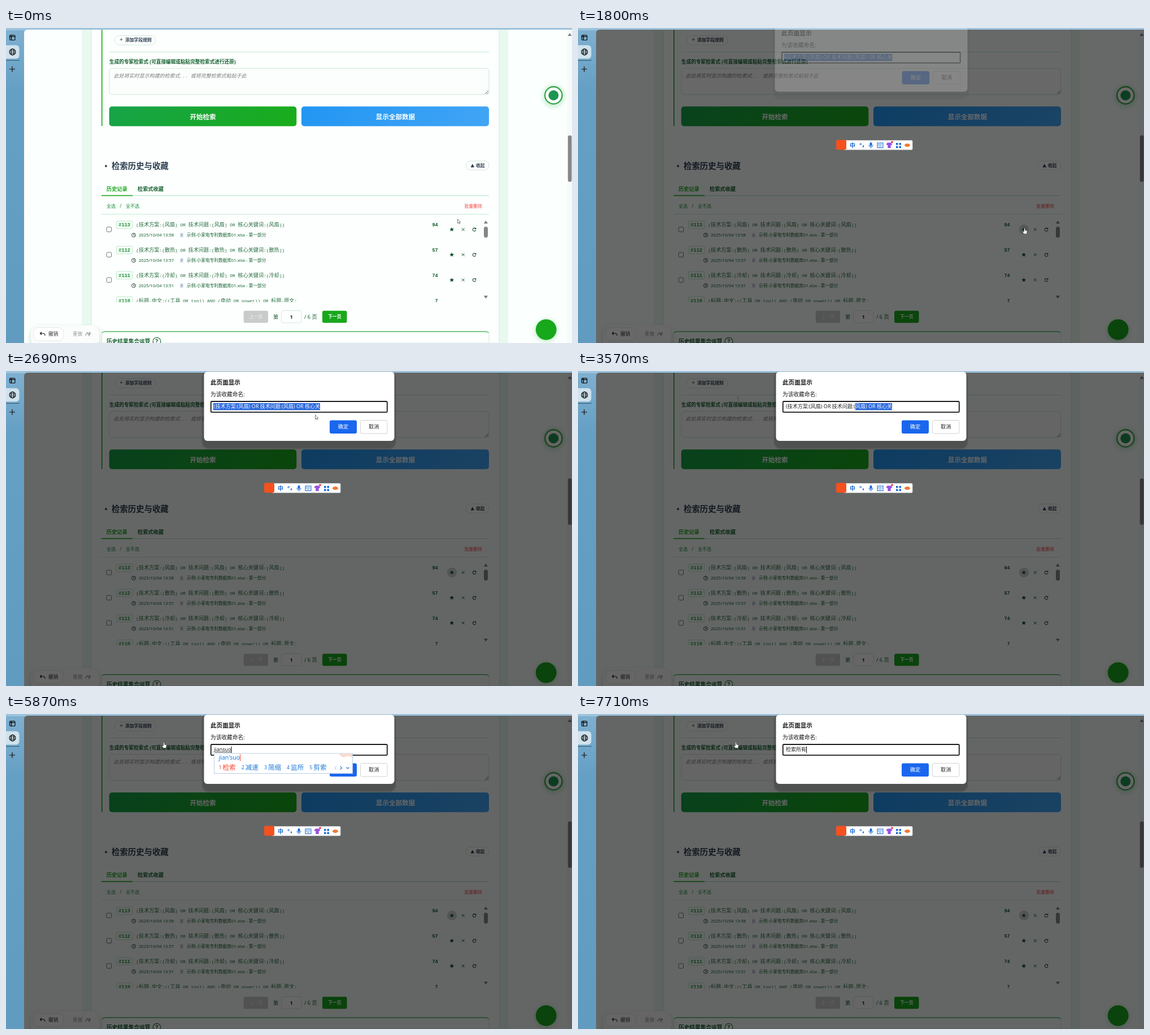
Write an HTML page that moves like this. It is 1002 by 559 pixels and loops after 8 s.

```html
<!DOCTYPE html>
<html lang="zh-CN">
<head>
<meta charset="utf-8">
<title>检索历史与收藏</title>
<style>
html, body { margin: 0; width: 100%; height: 100%; overflow: hidden; background: #649dc2; }
svg { display: block; width: 1002px; height: 559px; }
text { font-family: "Noto Sans", "Noto Sans CJK SC", sans-serif; white-space: pre; }
.mono { font-family: "Liberation Mono", "Noto Sans CJK SC", monospace; }
.b { font-weight: 700; }
.m { font-weight: 500; }
.mid { text-anchor: middle; }
.ink { fill: #2c3e50; }
.green { fill: #18a81c; }
.dark { fill: #14602f; }
.query { fill: #256b3f; }
.white { fill: #fff; }
.line { fill: none; stroke: #c4ead6; }
.pill { fill: #fdfffe; stroke: #d3e8dd; }
.stroke { fill: none; stroke: #111; }
.blue { fill: #1f7bd8; }
</style>
</head>
<body>
<svg viewBox="0 0 1002 559">
  <defs>
    <linearGradient id="go" gradientUnits="userSpaceOnUse" x1="183" y1="139.500" x2="365.800" y2="322.300">
      <stop offset="0" stop-color="#16a34a"/><stop offset="1" stop-color="#1aad19"/>
    </linearGradient>
    <linearGradient id="all" gradientUnits="userSpaceOnUse" x1="523" y1="139.500" x2="706.300" y2="322.800">
      <stop offset="0" stop-color="#2196f3"/><stop offset="1" stop-color="#42a5f5"/>
    </linearGradient>
    <linearGradient id="side" x1="0" y1="0" x2="0" y2="1">
      <stop offset="0" stop-color="#7fb0d0"/><stop offset=".2" stop-color="#659fc4"/><stop offset="1" stop-color="#619bc0"/>
    </linearGradient>
    <filter id="soft" x="-50%" y="-50%" width="200%" height="200%"><feGaussianBlur stdDeviation="3"/></filter>
    <filter id="edge" x="-10%" y="-20%" width="120%" height="140%"><feGaussianBlur stdDeviation="1.2"/></filter>
    <clipPath id="page"><path d="M32 559V9q0-6 6-6H1002V559z"/></clipPath>
    <clipPath id="list"><rect x="169" y="331" width="686" height="155.500"/></clipPath>
    <clipPath id="selClip"><rect id="selBox" y="56" height="14"/></clipPath>
    <path id="star" d="M0-4 1.1-1.3 4-1.2 1.8.6 2.5 3.4 0 1.8-2.5 3.4-1.8.6-4-1.2-1.1-1.3z" fill="#14502f"/>
    <path id="cross" d="M-2.4-2.4 2.4 2.4M2.4-2.4-2.4 2.4" stroke="#14502f" fill="none"/>
    <g id="redo"><path d="M2.2-1.6A2.8 2.8 0 1 0 2.8.8" stroke="#14502f" stroke-width="1.1" fill="none"/><path d="M3.3-3.4V-.4H.3z" fill="#14502f"/></g>
    <g id="clock" fill="none" stroke="#35493f"><circle r="3.5"/><path d="M0-2.4V.3H2.2"/></g>
    <g id="sheet"><path d="M-3-4H2L3-3V4H-3z" fill="#dfe3ee"/><path d="M-1.8-1.5H2M-1.8.3H2M-1.8 2H1" stroke="#8c93ba" stroke-width=".8"/></g>
  </defs>

  <rect width="1002" height="559" fill="url(#side)"/>
  <rect width="1002" height="4" fill="#9dc3dd"/>
  <rect x="-6" y="30.500" width="29.500" height="24" rx="6" fill="#cfe2ed"/>
  <g class="stroke" stroke-width="1.2">
    <rect x="6.500" y="12.500" width="9.500" height="9" rx="2"/><path d="M6.500 15H16M9.500 13V21" stroke-width="1.600"/>
    <circle cx="11.500" cy="42.500" r="5.400"/><ellipse cx="11.500" cy="42.500" rx="2.400" ry="5.400"/><path d="M6.500 40.700H16.500M6.500 44.300H16.500" stroke-width=".9"/>
    <path d="M6 73H16M11 68V78"/>
    <path d="M0 57.500H24" stroke="#35586e" stroke-width="1"/>
  </g>

  <g clip-path="url(#page)">
    <rect x="32" width="970" height="559" fill="#fbfffd"/>
    <rect x="134" width="755" height="559" fill="#e9f9f0"/>
    <path d="M151 0H873V559H151z" fill="#fcfffd" stroke="#cfe9dc"/>
    <rect x="169" width="1.600" height="174" class="green"/>

    <rect x="192.500" y="13.500" width="72.500" height="16.500" rx="8.200" class="pill"/>
    <text x="204" y="24.300" font-size="10" class="ink mid">+</text>
    <text x="211" y="24.400" font-size="7.800" class="ink b">添加字段规则</text>
    <path d="M183 42.500H855" class="line"/>
    <text x="183" y="62.700" font-size="8.650" class="dark b">生成的专家检索式 (可直接编辑或粘贴完整检索式进行还原)</text>
    <rect x="183" y="71.500" width="672" height="46.500" rx="5" fill="#fbfefc" stroke="#cfe6da"/>
    <text id="hint" x="190.800" y="87.800" class="mono" font-style="italic" fill="#7d7d7d"></text>
    <path d="M848 117 854 111M851.500 117 854 114.500" stroke="#555" stroke-width=".9"/>
    <rect x="182.700" y="139.200" width="331.600" height="35" rx="5" fill="url(#go)"/>
    <text x="348.500" y="161.800" font-size="11.550" class="white b mid">开始检索</text>
    <rect x="523" y="139.200" width="332" height="35" rx="5" fill="url(#all)"/>
    <text x="689.500" y="161.800" font-size="11.550" class="white b mid">显示全部数据</text>

    <circle cx="177" cy="245" r="1.900" class="ink"/>
    <text x="187" y="249.900" font-size="14.400" class="ink b">检索历史与收藏</text>
    <rect x="814.500" y="236" width="40.500" height="16" rx="8" class="pill"/>
    <path d="M822.500 247.300H829L825.800 241z" class="ink"/>
    <text x="832" y="246.900" font-size="7.700" class="ink b">收起</text>

    <text x="178" y="289" font-size="9.200" class="green b">历史记录</text>
    <text x="233" y="289" font-size="9.200" class="dark b">检索式收藏</text>
    <path d="M169 297.500H855" class="line" style="stroke:#aee3c6"/>
    <rect x="169" y="296.600" width="55" height="1.600" class="green"/>
    <g font-size="8" fill="#16883a">
      <text x="178" y="319">全选</text><text x="201.500" y="319">/</text><text x="212" y="319">全不选</text>
      <text x="811.500" y="319" font-size="7.800" fill="#ef4444">批量删除</text>
    </g>
    <path d="M169 330.500H855" class="line"/>
    <circle id="hover" cx="789.500" cy="357.500" r="8.700" fill="#d0d8d3"/>
    <g id="rows" clip-path="url(#list)"></g>
    <path d="M845.800 347H853L849.400 341.800zM845.800 475H853L849.400 480.200z" fill="#7c7f7d"/>
    <rect x="846" y="352.500" width="7" height="19.500" rx="3.500" fill="#858786"/>

    <rect x="420.700" y="501.700" width="43.300" height="21.500" rx="3" fill="#c9cbca"/>
    <text x="442.500" y="515.400" font-size="7.900" fill="#f3f5f4" class="mid m">上一页</text>
    <text x="473" y="516" font-size="9.200" class="dark">第</text>
    <rect x="487.500" y="501.500" width="35.500" height="21.500" rx="4" class="pill"/>
    <text x="505.200" y="515.800" font-size="9.200" class="mid b" fill="#222">1</text>
    <text x="528" y="516" font-size="9.200" class="dark">/ 6 页</text>
    <rect x="560" y="501.700" width="43.500" height="21.500" rx="3" class="green"/>
    <text x="581.800" y="515.400" font-size="7.900" class="white mid b">下一页</text>

    <path d="M169.500 559V544Q169.500 539 174.500 539H850Q855 539 855 544V559" fill="none" stroke="#d6eee0"/>
    <path d="M170 541Q171.500 538.700 174.500 538.700H850Q853 538.700 854.500 541" fill="none" stroke="#169a22" stroke-width="1.100"/>
    <text x="178" y="559.600" font-size="9.700" class="dark b">历史结果集合运算</text>
    <circle cx="267" cy="556" r="6.800" fill="#fdfffe" stroke="#14602f" stroke-width="1.100"/>
    <text x="267" y="559.700" font-size="10" class="dark mid b">?</text>

    <rect x="43" y="530" width="124" height="40" rx="16" fill="#b5cfc2" opacity=".6" filter="url(#soft)"/>
    <rect x="44" y="527.500" width="121.500" height="40" rx="16" fill="#fbfdfc"/>
    <rect x="48.500" y="531.500" width="53.500" height="23.500" rx="9" fill="#fff" stroke="#e2e8e5"/>
    <path d="M63 539.500 60.500 542 63 544.500M60.500 542H66Q69 542 69 546" class="stroke" stroke-width="1.100"/>
    <text x="75" y="546.200" font-size="8.650" fill="#333">撤销</text>
    <text x="118" y="546.200" font-size="8.650" fill="#9a9d9b">重做</text>
    <path d="M147 539.500 149.500 542 147 544.500M149.500 542H144Q141 542 141 546M143 539.500 148 547" fill="none" stroke="#8d908e" stroke-width="1.100"/>

    <circle cx="956" cy="537" r="21" fill="#9fe0b0" opacity=".45" filter="url(#soft)"/>
    <circle cx="956.200" cy="535.300" r="18.400" class="green"/>
    <circle cx="969.500" cy="121" r="20" fill="#a9e0ba" opacity=".5" filter="url(#soft)"/>
    <circle cx="969.300" cy="119.500" r="15.200" fill="#fff" stroke="#3aa84c" stroke-width="2.400"/>
    <circle cx="969.300" cy="119.500" r="9" fill="#1f9650"/>

    <rect x="993.500" width="8.500" height="559" fill="#f6faf8"/>
    <path d="M994.500 14H1001.500L998 9z" fill="#7c7f7d"/>
    <rect x="994.800" y="190.500" width="6.600" height="82.500" rx="3.300" fill="#858786"/>
    <rect id="scrim" x="32" width="970" height="559"/>
  </g>

  <g id="dialog">
    <rect x="347" y="0" width="343" height="138" rx="12" opacity=".2" filter="url(#edge)"/>
    <rect x="350.500" y="1" width="337" height="123" rx="6" class="white"/>
    <text x="362" y="23.900" font-size="10.600" class="b" fill="#1b1b1b">此页面显示</text>
    <text x="362" y="44.600" font-size="9.700" fill="#1b1b1b">为该收藏命名:</text>
    <rect x="362.800" y="54" width="312" height="19.200" rx="1.500" fill="#fff" stroke="#1a1a1a" stroke-width="1.800"/>
    <text x="368" y="66.300" font-size="9" fill="#222"><tspan id="typed"></tspan><tspan id="comp" text-decoration="underline"></tspan></text>
    <g clip-path="url(#selClip)">
      <rect x="367" y="57" width="189" height="12.500" fill="#2a68dc"/>
      <text id="picked" x="368" y="66.300" font-size="9" class="white"></text>
    </g>
    <rect id="caret" y="57.500" width="1" height="11.500"/>
    <rect x="573" y="87.500" width="48" height="23.500" rx="3" fill="#1a66ee"/>
    <text x="597" y="102.400" font-size="9.200" class="white mid">确定</text>
    <rect x="627.500" y="87.500" width="47.500" height="23.500" rx="3" fill="#fff" stroke="#d2d2d2"/>
    <text x="651.200" y="102.400" font-size="9.200" class="mid" fill="#222">取消</text>
  </g>

  <g id="popup">
    <rect id="popBox" y="70" height="35.500" fill="#fff" stroke="#b9cfe6"/>
    <text id="spell" y="80.800" font-size="10.500" class="blue"></text>
    <rect id="popCaret" y="71.500" width="1" height="12" fill="#f0452a"/>
    <g id="words"></g>
    <g id="nav">
      <path d="M-24 70.500H-.5V77Q-8 73-13 76T-24 70.500" fill="#fbd9cd"/>
      <g fill="none" stroke-width="1.200"><path d="M-29 93 -31.500 95.700-29 98.500" stroke="#c9d6e4"/><path d="M-22 92.700-19 95.700-22 98.700M-11 94.500-8.500 97-6 94.500" stroke="#1f7bd8"/></g>
    </g>
  </g>

  <g id="bar">
    <rect x="470" y="199.500" width="122" height="16.500" rx="1.500" fill="#fff" stroke="#d8dde2" stroke-width=".8"/>
    <rect x="457" y="198.500" width="18" height="17.500" rx="3" fill="#f4511e"/>
    <g style="fill:#1769d2">
      <text x="486" y="211.500" font-size="10" class="mid b">中</text>
      <circle cx="500.300" cy="206" r="1.300" fill="none" stroke="#1769d2"/><path d="M503.800 208.500H506V210.500L504.300 212.500z"/>
      <rect x="516.500" y="203" width="4" height="6.500" rx="2"/><path d="M514.800 207.500Q515 211 518.500 211T522.200 207.500M518.500 211V213.500" fill="none" stroke="#1769d2"/>
      <path d="M530 204H540V212.500H530z" fill="none" stroke="#1769d2" stroke-width="1.100"/><path d="M531.500 206.300H538.500M531.500 208.300H538.500M533 210.500H537" stroke="#1769d2" stroke-dasharray="1.500 .7"/>
      <path d="M548 203.500H554L556.500 206 555 208 553.700 207.200V213H548.300V207.200L547 208 545.500 206z" fill="#9a4fe0"/><circle cx="556" cy="202.300" r="1.900" fill="#f43b3b"/>
      <path d="M563 204H566.500V207.500H563zM568.500 204H572V207.500H568.500zM563 209.500H566.500V213H563zM568.500 209.500H572V213H568.500z"/>
      <ellipse cx="583" cy="208" rx="5" ry="3" fill="#ef7a35"/>
    </g>
  </g>

  <g id="tip">
    <rect x=".7" y=".7" width="29" height="17.600" fill="#fff" stroke="#222" stroke-width="1.400"/>
    <text x="6" y="12.900" font-size="9.200" fill="#444">收藏</text>
  </g>
  <g id="cursor" stroke="#444" stroke-width=".7" fill="#fff" stroke-linejoin="round">
    <path d="M0 0V7.500L1.800 6 3 8.500 4.200 8 3.100 5.500H5.300z"/>
    <path d="M-1 .8Q0-.3 1 .8V4L4 4.800Q5 5.300 4.700 7L3.800 10.500H-1L-3.300 7Q-3.500 5.500-2.200 5.800L-1 7z"/>
    <path d="M-2 0H2M0 0V10M-2 10H2" fill="none"/>
  </g>
</svg>

<script>
const $ = id => document.getElementById(id);
const show = (el, on) => { el.style.display = on ? "" : "none"; };

// Latin letters are set smaller than the Chinese ones beside them.
const mixed = (s, size) => s.replace(/[\x20-\x7e]+|[^\x20-\x7e]+/g, part =>
  `<tspan font-size="${part.charCodeAt(0) < 128 ? 7.93 : size}">${part}</tspan>`);

$("hint").innerHTML = mixed("此处将实时显示构建的检索式... 或将完整检索式粘贴于此", 9);

const query = w => `(技术方案:(${w}) OR 技术问题:(${w}) OR 核心关键词:(${w}))`;
const rows = [
  [113, query("风扇"), 94, "13:58"],
  [112, query("散热"), 57, "13:57"],
  [111, query("冷却"), 74, "13:51"],
  [110, "(标题-中文:((工具 OR tool) AND (电动 OR power)) OR 标题-原文:", 7, "13:50"],
];
$("rows").innerHTML = rows.map(([id, q, n, time], i) => `
  <g transform="translate(0 ${i * 44.8})">
    <rect x="178.2" y="353.300" width="8.400" height="8.400" rx="1.500" fill="#fff" stroke="#767676"/>
    <rect x="195.500" y="342.500" width="28.500" height="13.500" rx="2" fill="#f8fefa" stroke="#bfe8cd"/>
    <text x="199.300" y="352.300" font-size="8.650" class="mono b" fill="#18962e">#${id}</text>
    <text x="230.300" y="352.300" class="mono query">${mixed(q, 9.08)}</text>
    <text x="764.800" y="352.300" font-size="8.650" class="mono b dark" text-anchor="end">${n}</text>
    <use href="#clock" x="226" y="367.500"/>
    <use href="#sheet" x="311" y="367.500"/>
    <g font-size="7.650" class="dark"><text x="235" y="370.300">2025/10/04 ${time}</text>
    <text x="320" y="370.300">示例-小家电专利数据库01.xlsx - 第一部分</text></g>
    <use href="#star" x="789.200" y="357.500"/><use href="#cross" x="809.300" y="357.500"/><use href="#redo" x="829" y="357.500"/>
  </g>`).join("");

const ARROW = 0, HAND = 1, BEAM = 2;
const moves = [
  [0, 799.5, 339, ARROW], [680, 797.5, 344, ARROW], [830, 795, 348, ARROW], [950, 793, 351, HAND],
  [1080, 791.5, 354, HAND], [1200, 790.5, 355, HAND], [2380, 624.5, 184, ARROW], [2530, 568.5, 96, ARROW],
  [2690, 547.5, 78, ARROW], [2840, 551.5, 74, ARROW], [2990, 562, 61, BEAM], [3140, 566, 59, BEAM],
  [3300, 553, 58, BEAM], [3420, 539, 58, BEAM], [3570, 283.5, 46, BEAM], [3710, 281.5, 46, BEAM],
  [4000, 279.5, 50, HAND],
];

// Dialog: time, opacity, lift, scale, scrim
const fades = [[0, 0, 0, 1, 0], [1800, .2, -11, 1.012, .59], [1920, .8, -3, 1.004, .6], [2080, 1, 0, 1, .6]];

// Left edge of the selection
const picks = [[0, 367], [3140, 556], [3300, 552], [3420, 541], [3570, 491], [3710, 367], [5600, 556]];

// Typing: time, settled text, spelling, candidates ("~" cloud, "*" tick)
const name = "(技术方案:(风扇) OR 技术问题:(风扇) OR 核心关";
const typing = [
  [0, name], [5600, "", "j", "就 及 家 将 加"], [5750, "", "jian's", "检索 建设 减少 坚守 见识"],
  [5870, "", "jian'suo", "检索 减速 简缩 监所 剪索"], [5990, "检索"],
  [6140, "检索", "s", "是 上 所 说 时"], [6270, "检索", "su", "速 苏 素 诉 俗"], [6390, "检索", "suo", "所 锁 索 缩 梭"],
  [6690, "检索", "suo'yo", "所哟 ~ 所以* 所 锁"], [6840, "检索", "suo'you", "所有 ~ 所由* 所 锁"], [7710, "检索所有"],
];

const at = (list, t) => list.findLast(k => k[0] <= t);
$("picked").textContent = name;

function drawWords(left, list) {
  let x = left + 8, out = "";
  list.split(" ").forEach((w, i) => {
    const hue = i ? "#1f7bd8" : "#f0452a", tick = w.endsWith("*"), word = w.replace("*", "");
    out += `<text x="${x}" y="98" font-size="9" fill="${hue}">${i + 1}</text>`;
    x += 7;
    if (word === "~") {
      out += `<g transform="translate(${x + 5} 94.500)" fill="none" stroke="${hue}" stroke-width=".9"><ellipse rx="4.200" ry="2.600"/><circle r="1.100"/></g>`;
      x += 13.5;
    } else {
      out += `<text x="${x}" y="99" font-size="11.600" fill="${hue}">${word}</text>`;
      x += 11.6 * word.length;
    }
    if (tick) {
      out += `<path transform="translate(${x + 4} 91.500)" d="M3.200 0A3.200 3.200 0 1 1 1.500-2.800M-1.500-.3-.2 1 3-2.500" fill="none" stroke="${hue}" stroke-width=".8"/>`;
      x += 10;
    }
    x += 10;
  });
  $("words").innerHTML = out;
  return x + 36;
}

let last;
function type(state) {
  if (state === last) return;
  last = state;
  const [, text, spell = "", list] = state;
  $("typed").textContent = text;
  $("comp").textContent = spell.replace("'", "");
  const end = 368 + $("typed").parentNode.getComputedTextLength();
  $("caret").setAttribute("x", end);
  show($("popup"), list);
  if (!list) return;
  const left = 368.5 + 9 * text.length, right = drawWords(left, list);
  $("popBox").setAttribute("x", left);
  $("popBox").setAttribute("width", right - left);
  $("spell").setAttribute("x", left + 8);
  $("spell").textContent = spell;
  $("popCaret").setAttribute("x", left + 8 + $("spell").getComputedTextLength());
  $("nav").setAttribute("transform", `translate(${right})`);
}

function draw(t) {
  const [, x, y, kind] = at(moves, t);
  $("cursor").setAttribute("transform", `translate(${x} ${y})`);
  [...$("cursor").children].forEach((el, i) => show(el, i === kind));
  show($("hover"), t >= 950);

  const first = t >= 1650 && t < 1800, second = t >= 4620 && t < 5600;
  show($("tip"), first || second);
  $("tip").setAttribute("transform", first ? "translate(797 365.500)" : "translate(286.500 60.800)");

  const [, alpha, lift, scale, dim] = at(fades, t);
  show($("dialog"), alpha);
  show($("bar"), alpha);
  $("dialog").setAttribute("opacity", alpha);
  $("dialog").setAttribute("transform", `translate(${518.5 * (1 - scale)} ${lift}) scale(${scale} 1)`);
  $("scrim").setAttribute("opacity", dim);

  const edge = at(picks, t)[1];
  $("selBox").setAttribute("x", edge);
  $("selBox").setAttribute("width", 556 - edge);
  type(at(typing, t));
  show($("caret"), t >= 5600 && !(t >= 7270 && t < 7710));
}

let start;
function tick(now) {
  start ??= now;
  draw((now - start) % 8000);
  requestAnimationFrame(tick);
}
draw(0);
requestAnimationFrame(tick);
</script>
</body>
</html>
```
